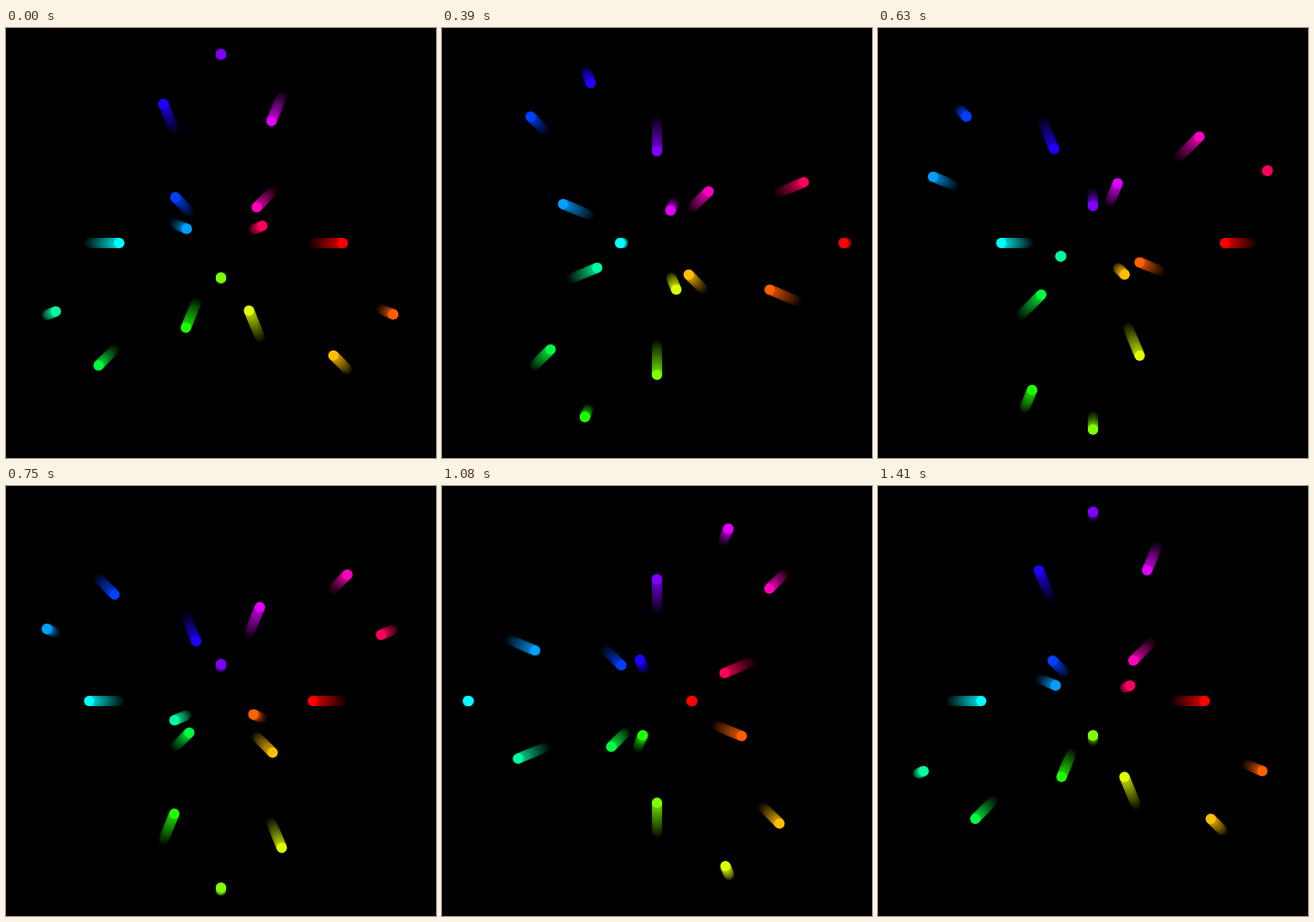
These frames come from a looping animation (500x500 px, 1440 ms). An HTML page with a canvas:

```html
<!DOCTYPE html>
<html>
<head>
<meta charset="utf-8">
<style>
  html, body { margin: 0; height: 100%; overflow: hidden; background: #000; }
  canvas { display: block; }
</style>
</head>
<body>
<canvas width="500" height="500"></canvas>
<script>
const ctx = document.querySelector('canvas').getContext('2d');
const DOTS = 16, STEP = 30, LOOP = 1440, TRAIL = 24;
const rad = deg => deg * Math.PI / 180;

function drawDot(angle, phase, brightness) {
  const r = 130 + 90 * Math.sin(rad(phase));
  ctx.fillStyle = `hsl(${angle}, 100%, ${50 * brightness}%)`;
  ctx.beginPath();
  ctx.arc(250 + r * Math.cos(rad(angle)), 250 + r * Math.sin(rad(angle)), 6, 0, 2 * Math.PI);
  ctx.fill();
}

function draw(time) {
  // The motion advances in discrete 30 ms steps.
  const tick = Math.floor((time % LOOP) / STEP) + 1;
  const turn = 360 * tick * STEP / LOOP;
  ctx.fillStyle = '#000';
  ctx.fillRect(0, 0, 500, 500);
  for (let k = 0; k < DOTS; k++) {
    const angle = k * 360 / DOTS;
    const phase = turn + 3 * angle;
    for (let lag = TRAIL - 1; lag > 0; lag--) {
      drawDot(angle, phase - lag, 0.8 * (1 - lag / TRAIL));
    }
    drawDot(angle, phase, 1);
  }
}

const start = performance.now();
function loop() {
  draw(performance.now() - start);
  requestAnimationFrame(loop);
}
loop();
</script>
</body>
</html>
```
